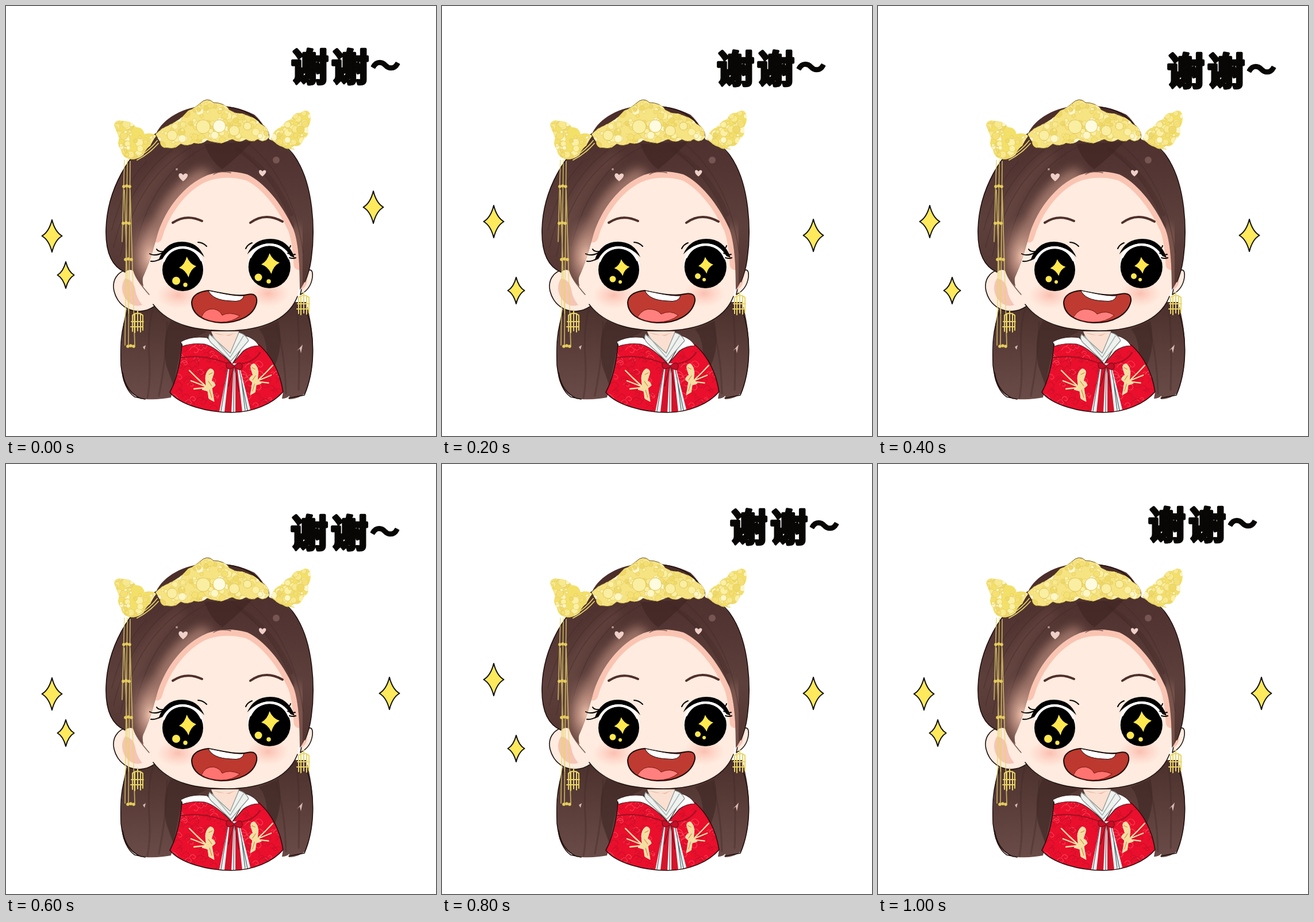
Recreate the animation shown at these times as an HTML page. Size 748 by 748 pixels, loop 1200 ms.

```html
<!DOCTYPE html>
<html lang="zh">
<head>
<meta charset="utf-8">
<style>
  html, body { margin: 0; width: 100%; height: 100%; overflow: hidden; background: #fff; }
  svg { display: block; width: 100%; height: 100%; }
  path { stroke-linecap: round; stroke-linejoin: round; }
  .line { fill: none; stroke: #21110f; stroke-width: 1.6; }
  .gold { fill: none; stroke: #e8d468; stroke-width: 1.7; }
  .star { fill: #ffe95c; stroke: #111; stroke-width: 2; }
  .spark { fill: #ffe850; }
  .words { font: 900 65px "Noto Sans CJK SC", "Noto Sans CJK", sans-serif; fill: #090706; stroke: #090706; stroke-width: 4.5; stroke-linejoin: round; }
</style>
</head>
<body>
<svg viewBox="0 0 748 748">
  <defs>
    <linearGradient id="hairFill" x1="0" y1="0" x2="0" y2="1">
      <stop offset="0" stop-color="#4a2c29"/><stop offset=".35" stop-color="#533633"/>
      <stop offset=".65" stop-color="#5d403c"/><stop offset="1" stop-color="#51342f"/>
    </linearGradient>
    <linearGradient id="lowFill" x1="0" y1="0" x2="0" y2="1">
      <stop offset="0" stop-color="#4a302c"/><stop offset=".5" stop-color="#5b3e3a"/><stop offset="1" stop-color="#6a4b47"/>
    </linearGradient>
    <radialGradient id="fade">
      <stop offset="0" stop-color="#f2c4ae"/><stop offset=".4" stop-color="#cb9b8b" stop-opacity=".7"/>
      <stop offset="1" stop-color="#8b625a" stop-opacity="0"/>
    </radialGradient>
    <radialGradient id="blush">
      <stop offset="0" stop-color="#f9ac9c" stop-opacity=".7"/><stop offset="1" stop-color="#fbc0af" stop-opacity="0"/>
    </radialGradient>
    <filter id="soft" x="-50%" y="-50%" width="200%" height="200%"><feGaussianBlur stdDeviation="9"/></filter>
    <path id="hair" d="M352 173C308 175 274 195 261 222C213 256 176 320 174 388C173 423 181 452 207 463Q215 456 222 461Q226 476 239 488Q236 474 240 468C248 450 255 428 262 402C273 362 302 318 342 298Q376 281 420 293C448 306 480 343 500 388C509 412 511 450 511 494C519 484 528 462 531 440C538 390 535 310 503 263Q488 242 458 232Q452 207 432 189Q395 171 352 173Z"/>
    <path id="cape" d="M306 586Q302 640 285 672C303 694 350 707 392 707C430 707 464 692 482 671Q474 620 440 587L418 585L394 622L350 582Z"/>
    <path id="tiara" d="M260 223Q272 211 284 207Q303 199 317 182Q329 178 337 170Q350 157 361 168Q379 168 388 180Q399 188 409 187Q432 192 443 205Q457 211 458 228Q448 240 438 232Q428 239 417 232Q406 239 394 232Q384 235 374 239Q360 238 350 233Q340 242 327 238Q316 246 304 240Q293 250 282 247Q269 248 268 236Z"/>
    <path id="hornL" d="M188 207Q190 197 204 200Q219 200 226 211Q238 210 241 223Q254 219 261 226Q255 234 251 243Q244 247 239 259Q226 269 213 266Q201 262 200 250Q192 241 197 230Z"/>
    <path id="hornR" d="M461 229Q468 213 478 211Q486 199 496 197Q502 184 512 186Q525 177 529 188Q532 201 525 211Q529 224 518 231Q513 246 501 243Q492 253 481 245Q470 242 461 229Z"/>
    <clipPath id="hairClip"><use href="#hair"/></clipPath>
    <clipPath id="capeClip"><use href="#cape"/></clipPath>
    <clipPath id="tiaraClip"><use href="#tiara"/></clipPath>
    <clipPath id="hornLClip"><use href="#hornL"/></clipPath>
    <clipPath id="hornRClip"><use href="#hornR"/></clipPath>
    <g id="bird" fill="#f5dfa0">
      <path d="M-3 -10Q-2 -22 5 -26Q13 -25 11 -17L7 -5Q13 -3 14 3L8 8L12 31L3 26L1 13L-9 10L-2 3Z" stroke="#fff2d0"/>
      <path d="M-4 3L-18 -10L-31 -23M-5 4L-28 -5M-3 7L-23 9" fill="none" stroke="#f7e3a8" stroke-width="2.4"/>
      <path d="M3 -16L9 -19M2 -4L8 4M4 11L8 24" fill="none" stroke="#d08a50" stroke-width="1.2"/>
    </g>
    <path id="heart" fill="#efd0c9" d="M0 7Q-10 -1 -7 -6Q-3 -9 0 -4Q4 -9 8 -5Q9 0 0 7Z"/>
  </defs>

  <!-- lower hair -->
  <path d="M213 515C199 560 197 625 204 651Q213 680 243 684Q267 685 287 681L310 592H440L482 671L480 683Q488 683 493 678L492 684Q508 684 520 674C540 630 537 565 522 515Z" fill="url(#lowFill)"/>
  <path d="M256 525Q246 560 249 610Q252 650 246 682M280 550Q280 605 266 678M470 556Q485 600 487 674M505 520Q512 570 509 668" fill="none" stroke="#432b29" stroke-width="3" opacity=".4"/>
  <path d="M286 548Q270 580 279 626L291 660L306 588L350 566ZM440 562Q456 580 454 620L468 625Q483 590 474 548Z" fill="#402825" opacity=".65"/>
  <path class="line" d="M212 530C199 565 199 592 200 625Q205 668 224 680L242 684M203 638Q208 671 235 683M522 528C539 575 537 635 519 677L492 682" stroke-width="1.2"/>
  <path d="M238 593l5 -3l-2 8zM506 600l10 -11l-3 15l-2 -8z" fill="#dbbab2"/>

  <!-- ears and face -->
  <path d="M214 458C192 461 184 479 188 496C194 520 214 532 233 531Q249 530 258 522L250 455ZM520 463Q535 452 533 472Q530 493 512 502Z" fill="#ffebdf" stroke="#21110f" stroke-width="1.6"/>
  <path d="M207 474Q197 490 207 508Q219 526 237 520Q227 508 225 494Q222 476 207 474ZM524 471Q514 478 513 493Q525 489 524 471Z" fill="#f5c5b5"/>
  <path d="M235 455C239 491 246 510 258 522C286 558 335 565 385 565C446 564 496 545 508 500C522 425 500 285 378 278C262 285 244 390 235 455Z" fill="#ffebdf"/>
  <path class="line" d="M256 519C285 558 337 565 385 565C444 564 491 547 507 505" stroke-width="2"/>
  <path d="M262 402C273 362 302 318 342 298Q376 283 420 294C448 306 480 343 500 388Q508 410 510 450" fill="none" stroke="#fac4b2" stroke-width="19"/>
  <ellipse cx="299" cy="503" rx="37" ry="24" fill="url(#blush)"/>
  <ellipse cx="456" cy="500" rx="36" ry="24" fill="url(#blush)"/>

  <!-- upper hair -->
  <use href="#hair" fill="url(#hairFill)"/>
  <g clip-path="url(#hairClip)" fill="none">
    <path d="M342 298C302 318 273 362 262 402" stroke="#b98a7b" stroke-width="30" opacity=".75" filter="url(#soft)"/>
    <path d="M300 262Q240 310 214 390" stroke="#7d5750" stroke-width="20" opacity=".4" filter="url(#soft)"/>
    <path d="M505 390Q515 430 511 490" stroke="#b08073" stroke-width="16" opacity=".6" filter="url(#soft)"/>
    <path d="M345 240Q356 270 376 284Q400 266 428 236Z" fill="#3b211f" opacity=".5"/>
    <path d="M403 250Q462 285 496 362" stroke="#3f2522" stroke-width="8" opacity=".3"/>
    <path d="M354 242Q259 284 225 417M321 246Q226 300 199 435M289 250Q214 305 187 420M420 238Q500 302 517 430M392 240Q465 292 499 382M245 270Q202 315 184 390" stroke="#3f2724" stroke-width="1.6" opacity=".4"/>
    <ellipse cx="251" cy="436" rx="46" ry="74" fill="url(#fade)"/>
  </g>
  <path class="line" d="M261 222C213 256 176 320 174 388C173 423 181 452 207 463M388 176Q425 180 447 209M464 234Q490 242 503 263C535 310 538 390 531 440Q528 462 520 480" stroke-width="1.2"/>
  <path d="M222 461Q226 476 249 502M361 293Q371 286 391 290" fill="none" stroke="#76514a" stroke-width="1.3"/>
  <use href="#heart" x="308" y="298"/>
  <use href="#heart" transform="translate(446 291) scale(.8)"/>
  <circle cx="470" cy="268" r="6" fill="#775552"/>
  <circle cx="297" cy="284" r="2" fill="#b4928d"/>

  <!-- brows and eyes -->
  <path d="M290 377Q314 361 341 374M425 377Q451 358 481 375" fill="none" stroke="#4f2f2b" stroke-width="4"/>
  <g id="eye">
    <ellipse cx="308" cy="455" rx="36" ry="40" fill="#fff"/>
    <ellipse cx="307.500" cy="459" rx="35.500" ry="37"/>
    <path d="M265 443Q276 410 306 410Q334 410 345 437Q328 418 306 418Q284 419 272 440Z"/>
    <path d="M274 444Q284 420 308 420Q330 421 340 442" fill="none" stroke="#fff" stroke-width="4"/>
  </g>
  <use href="#eye" transform="matrix(-1.03 0 0 1 775 -5)"/>
  <path d="M250 431Q259 436 273 429M252 444Q261 445 270 439M262 423Q265 428 274 427M334 411Q342 411 349 418M417 422Q420 415 428 412M488 421Q493 424 495 417M490 430Q497 434 503 432M493 438Q500 440 504 438" fill="none" stroke="#080606" stroke-width="2"/>

  <!-- two expressions -->
  <g class="pose">
    <path d="M352 495C377 500 403 506 420 502Q438 498 436 516C431 539 405 551 374 551C341 549 323 535 323 515Q325 498 352 495Z" fill="#bd382e" stroke="#1c0b09" stroke-width="2"/>
    <path d="M340 541Q346 526 361 527Q372 529 376 538Q388 531 407 539Q394 550 374 550Q352 549 340 541Z" fill="#ff7370" stroke="#7a1812"/>
    <path id="teeth" d="M352 495C377 500 396 505 414 504Q411 516 391 513Q359 512 352 495Z" fill="#fff" stroke="#1c0b09"/>
  </g>
  <g class="pose">
    <path d="M352 495C377 500 403 506 422 501Q441 497 440 513C435 538 407 552 374 551C341 549 323 535 323 515Q325 498 352 495Z" fill="#bf3b31" stroke="#1c0b09" stroke-width="2"/>
    <path d="M340 541Q350 524 367 528Q377 530 381 536Q397 528 411 538Q397 550 374 550Q352 549 340 541Z" fill="#ff807e" stroke="#7a1812"/>
    <use href="#teeth" x="1"/>
  </g>

  <!-- clothes -->
  <path d="M357 566Q361 581 390 608Q401 586 405 566Z" fill="#fbe0d1"/>
  <path d="M360 568Q381 578 403 566L388 574Z" fill="#eeb9a5"/>
  <use href="#cape" fill="#ea0f2c"/>
  <g id="swirls" clip-path="url(#capeClip)" fill="none"></g>
  <path d="M388 621L371 706Q398 710 425 702L405 622Z" fill="#f2f5f5"/>
  <path d="M389 625L380 706L392 707L396 625ZM399 625L399 707L411 706L402 625Z" fill="#d5142b"/>
  <path d="M386 630L374 705M405 629L420 703M397 628L396 706M409 646L416 703" fill="none" stroke="#537372" stroke-width="1.3"/>
  <path d="M304 584Q324 573 350 577Q372 598 392 622Q364 592 345 588Q322 586 307 592ZM405 571Q432 575 440 591Q425 591 413 600L394 622Q408 600 416 583Z" fill="#fff" stroke="#3d2220" stroke-width="1.2"/>
  <path d="M354 571Q350 579 357 586L391 618L422 582Q417 571 405 568L390 604Z" fill="#eff2ef" stroke="#8a9390" stroke-width="1.2"/>
  <path d="M359 574L390 611L413 574" fill="none" stroke="#aab6b2" stroke-width="1.5"/>
  <path d="M305 612Q342 605 386 622M411 622Q431 619 442 603" fill="none" stroke="#a81022" stroke-width="2.5" stroke-dasharray="4 2"/>
  <path d="M397 626Q382 614 383 626Q385 635 397 628Q411 638 411 626Q409 616 397 626L387 661M398 629L405 670" fill="#c50f27" stroke="#83101d" stroke-width="1.5"/>
  <use href="#bird" transform="translate(350 657)"/>
  <use href="#bird" transform="translate(436 647) scale(-.9 .95)"/>
  <path class="line" d="M306 588Q302 640 285 672C303 694 350 707 392 707C430 707 464 692 482 671Q474 620 440 589" stroke-width="1.2"/>

  <!-- jewellery -->
  <use href="#tiara" fill="#f6e382" stroke="#67522c"/>
  <use href="#hornL" fill="#f3e069"/>
  <use href="#hornR" fill="#f3e069"/>
  <g id="tiaraPearls" clip-path="url(#tiaraClip)"></g>
  <g id="hornLPearls" clip-path="url(#hornLClip)"></g>
  <g id="hornRPearls" clip-path="url(#hornRClip)"></g>
  <g fill="#faeea2" stroke="#e0c65c">
    <circle cx="343" cy="210" r="12"/><circle cx="371" cy="209" r="11" fill="#fffbe0"/>
    <circle cx="397" cy="217" r="9"/><circle cx="420" cy="209" r="7"/><circle cx="289" cy="225" r="9"/>
  </g>
  <path class="gold" d="M222 264Q242 260 263 234M228 268Q248 258 265 239M461 231Q477 246 501 249"/>
  <path class="gold" d="M206 268L202 410M211 268L207 590M216 270L213 592M206 320L213 535M216 320L224 590" stroke-width="1" opacity=".75"/>
  <g id="beads" fill="#e6cd5e"></g>
  <g id="earring" class="gold">
    <path d="M229 529V565M220 538Q229 531 238 538V564M220 538V566M218 549H239M217 558H238M224 535V568M234 535V567" stroke-width="2"/>
  </g>
  <use href="#earring" x="289" y="-31"/>

  <g id="sparks"></g>
  <g id="stars"></g>
  <text id="words" class="words"><tspan x="2" y="58">谢</tspan><tspan x="72" y="58">谢</tspan><tspan x="140" y="51" font-size="52" stroke-width="2.500">～</tspan></text>
</svg>
<script>
  const $ = id => document.getElementById(id);
  let seed = 37;
  const rnd = (a, b) => a + (b - a) * ((seed = seed * 16807 % 2147483647) / 2147483647);

  function add(parent, tag, attrs) {
    const el = document.createElementNS('http://www.w3.org/2000/svg', tag);
    for (const k in attrs) el.setAttribute(k, attrs[k]);
    return parent.appendChild(el);
  }

  function pearls(id, x, y, w, h, count) {
    const tones = ['#fbf0a4', '#f8e98e', '#f5e074', '#efd968', '#fdf6c6'];
    for (let i = 0; i < count; i++) {
      add($(id), 'circle', {
        cx: rnd(x, x + w), cy: rnd(y, y + h), r: rnd(2, 7),
        fill: tones[i % 5], stroke: '#e3ca62', 'stroke-width': .7
      });
    }
  }
  pearls('tiaraPearls', 260, 163, 200, 83, 190);
  pearls('hornLPearls', 187, 198, 74, 70, 65);
  pearls('hornRPearls', 461, 181, 70, 69, 65);

  for (let i = 0; i < 150; i++) {
    const x = rnd(285, 480), y = rnd(590, 706), r = rnd(3, 9);
    add($('swirls'), 'path', {
      d: `M${x - r} ${y}q${r} ${-r * 1.6} ${r * 2} 0q${-r * .3} ${r} ${-r} ${r * .4}`,
      stroke: i % 3 ? '#c9102a' : '#fb3f55', 'stroke-width': 1.1
    });
  }
  for (const [y, x] of [[314, 205], [378, 204], [441, 208], [592, 212]]) {
    for (let i = 0; i < 3; i++) add($('beads'), 'circle', { cx: x + i * 5, cy: y - i % 2, r: 2.8 });
  }

  const starPath = (w, h) =>
    `M0 ${-h}Q${w * .3} ${-h * .25} ${w} 0Q${w * .3} ${h * .25} 0 ${h}Q${-w * .3} ${h * .25} ${-w} 0Q${-w * .3} ${-h * .25} 0 ${-h}Z`;

  const stars = [[17.5, 28], [14.5, 23], [17.5, 28]].map(([w, h]) =>
    add($('stars'), 'path', { class: 'star', d: starPath(w, h) }));

  // each eye: star x, y, w, h, then two dots as x, y, r
  const glints = [
    [[316, 454, 15, 18, 296, 478, 7, 312, 485, 3.7], [460, 448, 16, 18, 439, 472, 6.5, 457, 479, 3.8]],
    [[313, 455, 13.5, 14.5, 297, 475, 5.5, 310, 480, 3], [459, 451, 13, 14.5, 445, 470, 5, 456, 476, 3]]
  ];
  const sparks = glints.map(pair => {
    const g = add($('sparks'), 'g', { class: 'spark' });
    for (const [x, y, w, h, ...dots] of pair) {
      add(g, 'path', { d: starPath(w, h), transform: `translate(${x} ${y}) rotate(-5)` });
      for (let i = 0; i < 6; i += 3) add(g, 'circle', { cx: dots[i], cy: dots[i + 1], r: dots[i + 2] });
    }
    return g;
  });
  const mouths = document.querySelectorAll('.pose');

  const poses = [0, 1, 1, 0, 1, 0];
  const wordAt = [[494, 72], [476, 75], [501, 79], [493, 86], [499, 76], [468, 72]];
  const leftAt = [[[80, 400], [104, 468]], [[90, 375], [129, 495]]];
  const move = (el, [x, y]) => el.setAttribute('transform', `translate(${x} ${y})`);

  function draw(now) {
    const step = Math.floor(now % 1200 / 200), pose = poses[step];
    for (let i = 0; i < 2; i++) {
      const shown = i === pose ? 'visible' : 'hidden';
      mouths[i].setAttribute('visibility', shown);
      sparks[i].setAttribute('visibility', shown);
      move(stars[i], leftAt[pose][i]);
    }
    move(stars[2], step === 0 ? [639, 350] : pose ? [646, 399] : [667, 399]);
    move($('words'), wordAt[step]);
  }

  const start = performance.now();
  function tick() {
    draw(performance.now() - start);
    requestAnimationFrame(tick);
  }
  tick();
</script>
</body>
</html>
```
